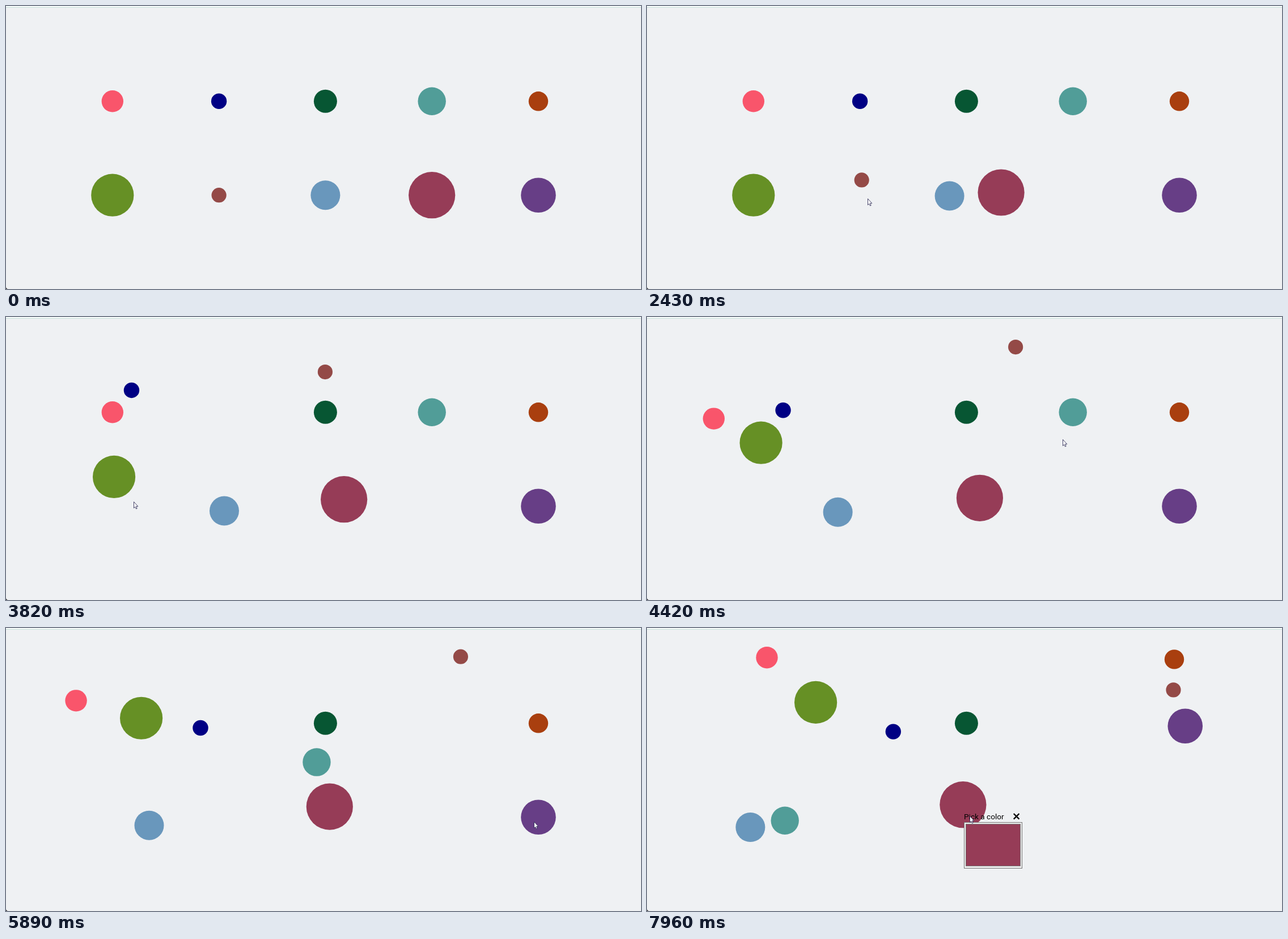
An HTML page with a canvas for the animation above (8 s loop, 1120 by 500 pixels).

```html
<!DOCTYPE html>
<html lang="en">
<head>
<meta charset="utf-8">
<title>Drifting balls</title>
<style>
  html, body { margin: 0; width: 100%; height: 100%; overflow: hidden; background: #eff1f3; }
  canvas { display: block; }
</style>
</head>
<body>
<canvas id="stage" width="1120" height="500"></canvas>
<script>
const ctx = document.getElementById('stage').getContext('2d');
const LOOP = 8000, STEP = 76.7, PHASE = 980;
const DRAG = 0.307;   // air friction per second
const BOUNCE = 0.92;  // share of motion kept at a wall
const TOP = 2, COLUMNS = 5;
const PICKER_AT = 7480;

const kick = (at, dx, dy) => ({ at, dx, dy }); // dx, dy: glide until rest
const ball = (color, r, ...kicks) => ({ color, r, kicks });

// Two rows of five, each with the pushes it receives.
const balls = [
  ball('#f9556b', 19.2, kick(3888, -280, 251), kick(4190, -633, -153), kick(6740, 27, -177)),
  ball('#000084', 13.7, kick(2878, -615, -1102), kick(3888, 185, 125), kick(4580, 290, 21)),
  ball('#075633', 20.5),
  ball('#519d98', 24.7, kick(5000, -851, 288)),
  ball('#a93f0f', 17.2, kick(6990, -35, -732)),
  ball('#669025', 37.6, kick(3450, 26, -485), kick(4190, 112, -188), kick(6740, 140, -7)),
  ball('#944a47', 13.1, kick(2350, 116, -1012), kick(2878, 678, -342)),
  ball('#6997bc', 26, kick(2219, -460, 21.5)),
  ball('#963c57', 41.1, kick(1370, -527, -14), kick(2219, -88, -22.7)),
  ball('#673e86', 30.8, kick(6150, 10, -518), kick(6990, 31, -168))
];

// Where the pointer rests: arrival time and place.
const TRAVEL = 400;
const stops = [
  [440, 1022, 464], [750, 758, 328], [1590, 389, 340], [3200, 225, 326],
  [4420, 733, 216], [5880, 931, 342], [6800, 722, 284], [7350, 569, 332]
];

const clamp = u => Math.min(1, Math.max(0, u));
const smooth = u => u * u * (3 - 2 * u);
const reflect = (v, wall) => v < wall ? wall + BOUNCE * (wall - v) : v;

function ballAt({ r, kicks }, index, t) {
  let x = 187.8 * (index % COLUMNS + 1);
  let y = 2.4 + 165.9 * (Math.floor(index / COLUMNS) + 1);
  kicks.forEach(({ at, dx, dy }, i) => {
    if (t <= at) return;
    const end = i + 1 < kicks.length ? Math.min(t, kicks[i + 1].at) : t;
    const share = 1 - Math.exp(-DRAG * (end - at) / 1000);
    x = reflect(x + dx * share, r);
    y = reflect(y + dy * share, TOP + r);
  });
  return [x, y];
}

function pointerAt(t) {
  let [, x, y] = stops[0];
  for (const [at, nx, ny] of stops) {
    const u = smooth(clamp(1 - (at - t) / TRAVEL));
    x += (nx - x) * u;
    y += (ny - y) * u;
  }
  return [x, y];
}

function rect(color, x, y, w, h) {
  ctx.fillStyle = color;
  ctx.fillRect(x, y, w, h);
}

function drawStage() {
  rect('#eff1f3', 0, 0, 1120, 500);
  rect('#f8fcfb', 0, 0, 1120, 2);
  rect('#c6dfd9', 0, 2, 1120, 1);
  ctx.fillStyle = '#111';
  ctx.fill(new Path2D('M0 496Q0 500 4 500H0Z'));
}

function drawBall(color, r, [x, y]) {
  ctx.fillStyle = color;
  ctx.beginPath();
  ctx.arc(x, y, r, 0, 2 * Math.PI);
  ctx.fill();
}

function drawPicker() {
  ctx.fillStyle = '#000';
  ctx.font = '13.6px Roboto, sans-serif';
  ctx.fillText('Pick a color', 559, 337.5);
  ctx.strokeStyle = '#000';
  ctx.lineWidth = 2.4;
  ctx.stroke(new Path2D('M646.8 328l9.6 9.6M656.4 328l-9.6 9.6'));
  rect('#767676', 559, 343, 103, 82);
  rect('#efefef', 560, 344, 101, 80);
  rect('#777', 562, 346, 97, 75);
  rect('#963c57', 563, 347, 95, 73);
}

const arrow = new Path2D('M.5 .5V11.6L2.8 9.4L4.5 13L6.1 12.3L4.6 8.6H7.8Z');

function drawPointer([x, y]) {
  ctx.save();
  ctx.translate(x, y);
  ctx.fillStyle = '#fff';
  ctx.fill(arrow);
  ctx.lineWidth = 0.9;
  ctx.strokeStyle = '#33305a';
  ctx.stroke(arrow);
  ctx.restore();
}

function frame(now) {
  const real = now % LOOP;
  const t = PHASE + Math.floor((real + 12 - PHASE) / STEP) * STEP;
  drawStage();
  balls.forEach((b, i) => drawBall(b.color, b.r, ballAt(b, i, t)));
  if (t >= PICKER_AT) drawPicker();
  if (real >= 440) drawPointer(pointerAt(t));
  requestAnimationFrame(frame);
}

requestAnimationFrame(frame);
</script>
</body>
</html>
```
